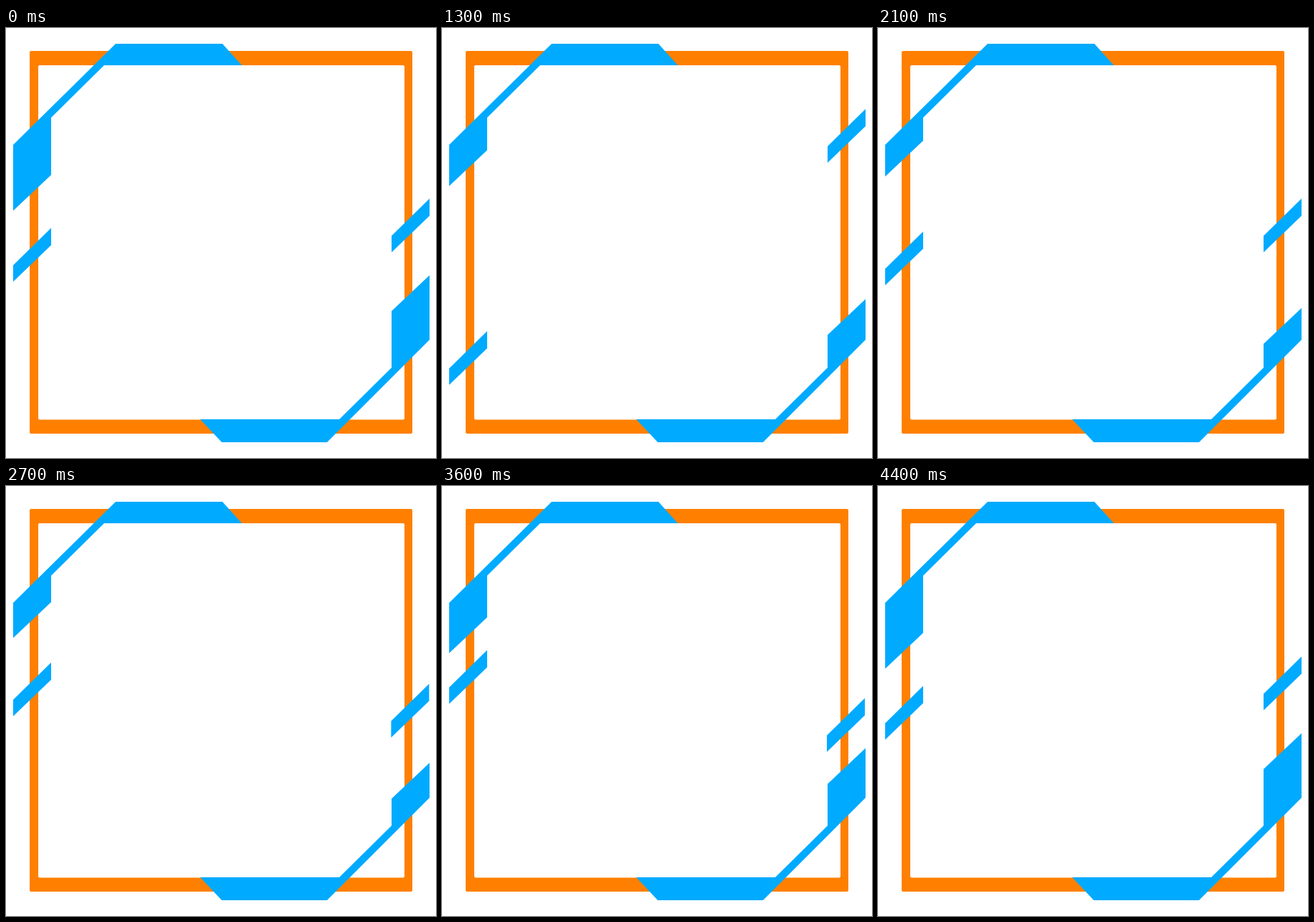
An HTML page with a canvas for the animation above (5 s loop, 600 px wide and 600 px high).

```html
<!DOCTYPE html>
<html lang="en">
<head>
<meta charset="utf-8">
<title>Animated frame</title>
<style>
  html, body { margin: 0; width: 100%; height: 100%; overflow: hidden; background: #fff; }
  canvas { display: block; width: 600px; height: 600px; }
</style>
</head>
<body>
<canvas id="stage" width="600" height="600"></canvas>
<script>
const ctx = document.getElementById('stage').getContext('2d');
const ORANGE = '#ff8000';
const BLUE = '#00aaff';
const LOOP = 5000, STEP = 100, LAST = 4400;

// Eased progress from 0 to 1 between two times, partly linear.
function ramp(t, start, end) {
  const u = Math.max(0, Math.min(1, (t - start) / (end - start)));
  return (u + u * u * (3 - 2 * u)) / 2;
}

// Near-linear there and back, with a short rest in the middle.
function swing(t) {
  const u = 1 - Math.abs(2 * t / LAST - 1);
  return (5 * u - u ** 5) / 4;
}

function poly(...pts) {
  ctx.beginPath();
  pts.forEach(([x, y]) => ctx.lineTo(x, y));
  ctx.closePath();
  ctx.fill();
}

function slash(x, y) {
  poly([x, y + 52], [x + 53, y], [x + 53, y + 24], [x, y + 75]);
}

function border() {
  ctx.fillStyle = ORANGE;
  ctx.beginPath();
  ctx.roundRect(33, 32, 534, 534, 2);
  ctx.roundRect(45, 52, 511, 494.5, 2);
  ctx.fill('evenodd');
}

function draw(t) {
  ctx.fillStyle = '#fff';
  ctx.fillRect(0, 0, 600, 600);
  border();

  const left = 48 * swing(t), right = 46 * swing(t);
  ctx.fillStyle = BLUE;
  poly([153, 22], [302, 22], [329, 52], [137, 52], [63, 125],
    [63, 205 - left], [10, 255 - left], [10, 163]);
  poly([448, 578], [301, 578], [271, 546], [465, 546], [538, 474],
    [538, 395 + right], [591, 345 + right], [591, 435]);

  // The slashes part widely, come back, then close in and return.
  const open = ramp(t, 0, 600);
  const near = ramp(t, 2200, 3000) - ramp(t, 3600, LAST);
  slash(10, 279 + 144 * (open - ramp(t, 1300, 2150)) - 50 * near);
  slash(538 - near, 238 - 125 * (open - ramp(t, 1300, 2100)) + 58 * near);
}

function tick() {
  const t = performance.now() % LOOP;
  draw(Math.min(LAST, Math.floor(t / STEP) * STEP));
  requestAnimationFrame(tick);
}
tick();
</script>
</body>
</html>
```
